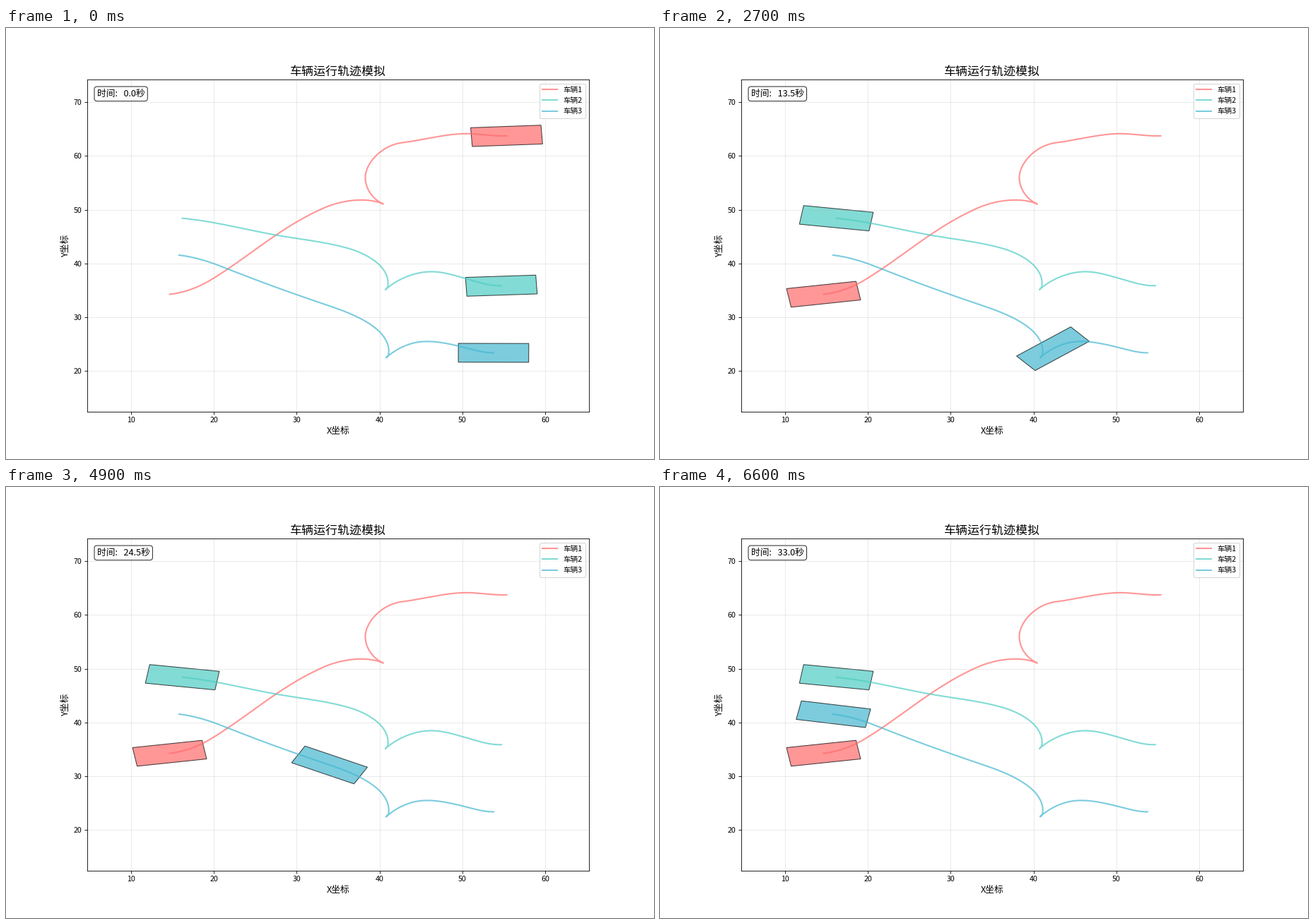
Animation, 917 px wide and 611 px high, one loop 6700 ms. Source, as a matplotlib script:

```python
import numpy as np
import matplotlib.pyplot as plt
from matplotlib.animation import FuncAnimation
from matplotlib.patches import Polygon

plt.rcParams["font.family"] = ["Noto Sans CJK JP"]

DPI = 76.4
WIDTH, HEIGHT = 917, 611
FRAMES, INTERVAL = 67, 100
SECONDS_PER_FRAME = 0.5
CAR_LENGTH, CAR_WIDTH = 8.5, 3.5

# Key poses (x, y, heading in degrees): each car reverses to its cusp, then drives forward.
CARS = [
    dict(name="车辆1", color="#FF6B6B", start=0, span=6.5, cusp=4, poses=[
        (55.34, 63.73, 3.4), (50.35, 64.13, 1), (42.84, 62.49, 10),
        (38.28, 55.97, 90), (40.45, 51.06, 145), (37.81, 51.81, 180),
        (33.29, 50.34, 214), (19.64, 36.97, 223), (14.65, 34.29, 188.9)]),
    dict(name="车辆2", color="#4ECDC4", start=4.5, span=7.5, cusp=3, poses=[
        (54.70, 35.89, 3.1), (50.35, 37.24, -23), (46.25, 38.49, 0),
        (40.71, 35.14, 55), (41.00, 35.85, 84), (39.77, 40.05, 127),
        (36.28, 42.80, 156), (27.74, 45.23, 165), (16.19, 48.42, 171.6)]),
    dict(name="车辆3", color="#45B7D1", start=8, span=58.4, cusp=3, poses=[
        (53.76, 23.41, 0), (49.93, 24.53, -20), (45.24, 25.50, 5.3),
        (40.80, 22.50, 55), (41.09, 23.21, 84), (39.70, 27.75, 127),
        (34.11, 32.04, 152.5), (22.34, 38.61, 148.4), (15.80, 41.56, 170)]),
]

# Drive profile (time, progress): 0..1 is the reversing leg, 1..2 the forward leg.
KEYS = [(0, 0), (5, 0.092), (14, 0.614), (20, 0.883), (23, 1), (25, 1.023),
        (27, 1.038), (34, 1.178), (41, 1.386), (51, 1.785), (58.4, 2)]
KEY_TIME, KEY_POS = np.array(KEYS).T


def hermite(p0, p1, m0, m1, v):
    return ((2 * v**3 - 3 * v**2 + 1) * p0 + (v**3 - 2 * v**2 + v) * m0
            + (3 * v**2 - 2 * v**3) * p1 + (v**3 - v**2) * m1)


def drive(poses, gear):
    """Curve through the poses at equal arc steps, with the heading at each sample."""
    v = np.linspace(0, 1, 300)[:, None]
    parts = []
    for a, b in zip(poses, poses[1:]):
        p0, p1 = np.array(a[:2]), np.array(b[:2])
        reach = gear * np.hypot(*(p1 - p0))
        m0, m1 = (reach * np.array([np.cos(h), np.sin(h)])
                  for h in np.radians([a[2], b[2]]))
        parts.append(hermite(p0, p1, m0, m1, v)[:-1])
    dense = np.vstack(parts + [[p1]])
    s = np.append(0, np.cumsum(np.hypot(*np.diff(dense, axis=0).T)))
    even = np.linspace(0, s[-1], 600)
    xy = np.column_stack([np.interp(even, s, c) for c in dense.T])
    dx, dy = gear * np.gradient(xy, axis=0).T
    return xy, np.unwrap(np.arctan2(dy, dx))


def key_slopes():
    """Monotone slopes that are zero at both ends and at the cusp."""
    d = np.diff(KEY_POS) / np.diff(KEY_TIME)
    slopes = np.zeros(len(KEYS))
    slopes[1:-1] = 2 * d[:-1] * d[1:] / (d[:-1] + d[1:])
    slopes[KEY_POS == 1] = 0
    return slopes


KEY_SLOPE = key_slopes()


def progress(u):
    t = np.clip(u, 0, 1) * KEY_TIME[-1]
    k = min(np.searchsorted(KEY_TIME, t, side="right") - 1, len(KEYS) - 2)
    h = KEY_TIME[k + 1] - KEY_TIME[k]
    return hermite(KEY_POS[k], KEY_POS[k + 1], h * KEY_SLOPE[k],
                   h * KEY_SLOPE[k + 1], (t - KEY_TIME[k]) / h)


def body(car, frame):
    """Corners of the car at the given frame."""
    p = progress((frame - car["start"]) / car["span"])
    leg = int(p >= 1)
    xy, heading = car["legs"][leg]
    n = np.arange(len(xy))
    x, y, angle = (np.interp((p - leg) * n[-1], n, c) for c in (*xy.T, heading))
    c, s = np.cos(angle), np.sin(angle)
    box = np.array([(-1, -1), (1, -1), (1, 1), (-1, 1)]) * (CAR_LENGTH / 2, CAR_WIDTH / 2)
    return box @ np.array([(c, s), (-s, c)]) + (x, y)


# The tiny margin keeps the pixel size from rounding down.
fig, ax = plt.subplots(figsize=((WIDTH + 1e-6) / DPI, (HEIGHT + 1e-6) / DPI), dpi=DPI)
ax.set_xlim(4.68, 65.31)
ax.set_ylim(12.49, 74.16)
ax.set_title("车辆运行轨迹模拟", fontsize=16)
ax.set_xlabel("X坐标", fontsize=12)
ax.set_ylabel("Y坐标", fontsize=12)
ax.grid(True, alpha=0.3)

for car in CARS:
    poses, cusp = car["poses"], car["cusp"]
    car["legs"] = [drive(poses[:cusp + 1], -1), drive(poses[cusp:], 1)]
    track = np.vstack([xy for xy, _ in car["legs"]])
    ax.plot(*track.T, color=car["color"], lw=2, alpha=0.7, label=car["name"])
    car["patch"] = ax.add_patch(Polygon(body(car, 0), facecolor=car["color"],
                                        edgecolor="black", lw=1, alpha=0.7))

ax.legend(loc="upper right", fontsize=10)
clock = ax.text(0.02, 0.95, "", transform=ax.transAxes, fontsize=12,
                bbox=dict(boxstyle="round", facecolor="white", alpha=0.8))


def update(frame):
    for car in CARS:
        car["patch"].set_xy(body(car, frame))
    clock.set_text(f"时间:   {frame * SECONDS_PER_FRAME:.1f}秒")
    return [car["patch"] for car in CARS] + [clock]


anim = FuncAnimation(fig, update, frames=FRAMES, interval=INTERVAL,
                     repeat=True, repeat_delay=0, blit=False)
plt.show()
```
